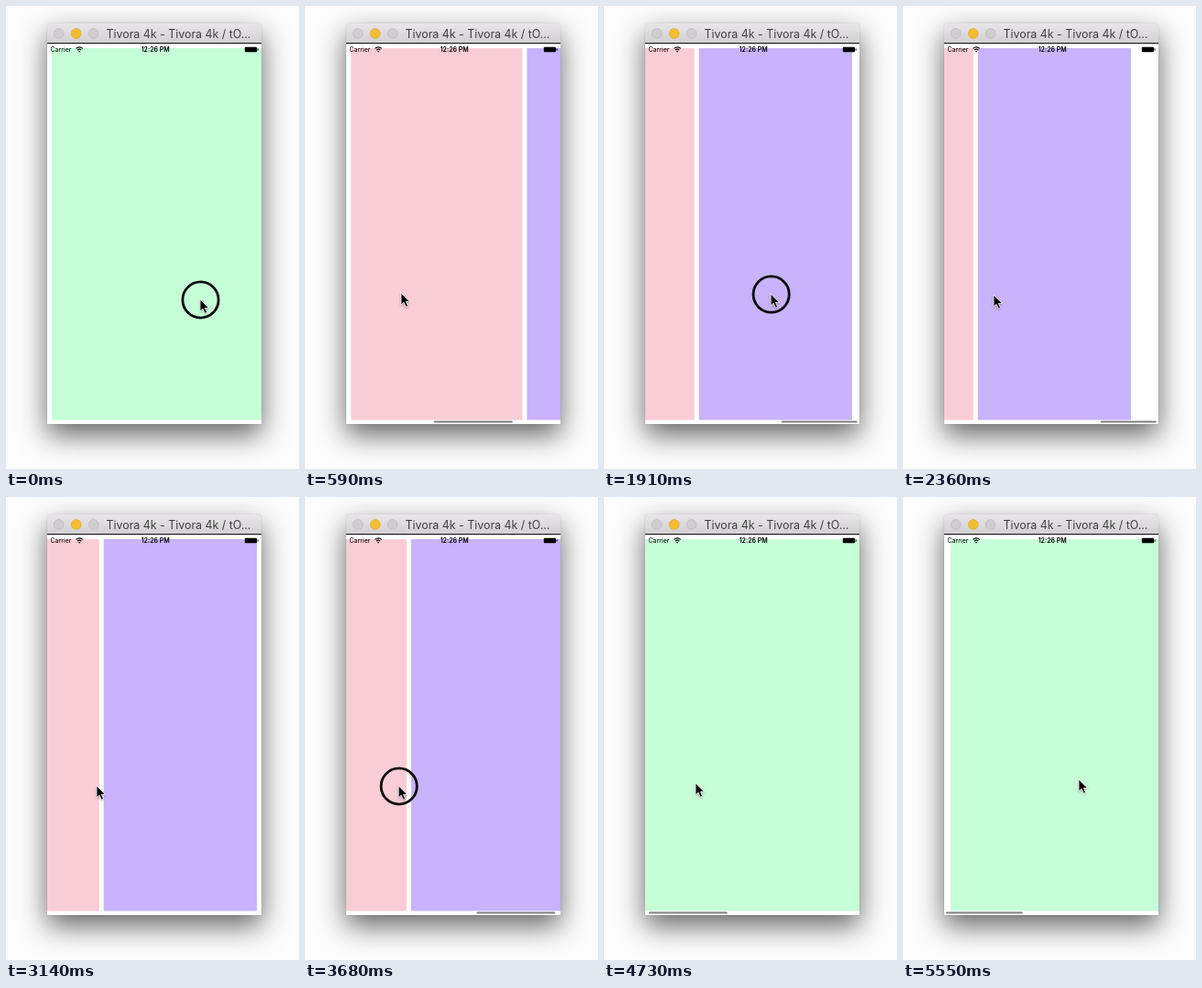
Write an HTML page that moves like this. It is 320 px wide and 505 px high and loops after 5.6 s.

```html
<!DOCTYPE html>
<html lang="en">
<head>
<meta charset="utf-8">
<title>Paged cells</title>
<style>
  html, body { margin: 0; width: 100%; height: 100%; overflow: hidden; background: #fdfcfd; }
  #stage { position: relative; width: 320px; height: 505px; overflow: hidden; }
  #shadow {
    position: absolute; left: 45px; top: 19px; width: 234px; height: 437px;
    border-radius: 4px 4px 0 0;
    box-shadow: 0 12px 30px rgba(0, 0, 0, .6), 0 0 1px rgba(0, 0, 0, .4);
  }
  svg { position: absolute; left: 0; top: 0; display: block; }
  text { font-family: Inter, "Open Sans", sans-serif; }
</style>
</head>
<body>
<div id="stage">
  <div id="shadow"></div>
  <svg width="320" height="505" viewBox="0 0 320 505">
    <defs>
      <linearGradient id="bar" x2="0" y2="1">
        <stop stop-color="#e8e6e8"/><stop offset="1" stop-color="#d1cfd1"/>
      </linearGradient>
      <clipPath id="screen"><path d="M45 41h234v415H45z"/></clipPath>
    </defs>

    <path d="M45 41V23q0-4 4-4h226q4 0 4 4v18z" fill="url(#bar)"/>
    <g stroke-width=".7">
      <circle cx="57.7" cy="30" r="5.4" fill="#cfcdcf" stroke="#bbb9bb"/>
      <circle cx="76.7" cy="30" r="5.4" fill="#f4bd31" stroke="#dda72b"/>
      <circle cx="95.6" cy="30" r="5.4" fill="#cfcdcf" stroke="#bbb9bb"/>
    </g>
    <text x="109.5" y="34.5" font-size="12.4" fill="#414041">Tivora 4k - Tivora 4k / tO...</text>

    <path d="M45 40h234v416H45z" fill="#fff"/>
    <path d="M45 40h234v1.2H45z" fill="#222"/>
    <g clip-path="url(#screen)">
      <g id="cells"></g>
      <rect id="thumb" y="452.6" height="2" rx="1" fill="#808080"/>
    </g>

    <text x="48.5" y="50.2" font-size="7">Carrier</text>
    <g fill="none" stroke="#000" stroke-width="1.1">
      <path d="M76.4 46.4q3.7-3 7.4 0M77.9 48q2.2-1.8 4.4 0"/>
      <path d="M79.3 49.6h1.6"/>
    </g>
    <text x="163.2" y="50.3" font-size="7" font-weight="600" text-anchor="middle">12:26 PM</text>
    <rect x="260.8" y="44.8" width="13.2" height="5.4" rx="1"/>
    <path d="M274.6 46.2h.9v2.6h-.9z"/>

    <circle id="touch" r="19.6" fill="none" stroke="#0a0a0a" stroke-width="2.8"/>
    <path id="cursor" d="M0 0V13l3-2.8 2.2 5 2.3-1-2.2-4.8h4.2z"
          stroke="#fff" stroke-width=".8"
          style="filter:drop-shadow(0 1px 1px rgba(0,0,0,.3))"/>
  </svg>
</div>
<script>
const $ = id => document.getElementById(id);
const LOOP = 5600, VIEW = 234, LEFT = 45, SCALE = VIEW / 375;
const MAX = 1000 * SCALE - VIEW;

// Cells in points: start, width, colour
const cells = [[8, 400, '#c6ffd7'], [416, 300, '#f9cdd5'], [724, 268, '#c8b3fc']].map(([x, w, fill]) => {
  const r = document.createElementNS('http://www.w3.org/2000/svg', 'rect');
  const attrs = { y: 46, height: 405.5, width: w * SCALE, fill };
  for (const k in attrs) r.setAttribute(k, attrs[k]);
  $('cells').append(r);
  return { r, x: LEFT + x * SCALE };
});

const smooth = u => u * u * (3 - 2 * u);
const flick = u => u * u * u;

// Pointer path: time, x, y, easing towards this point
const path = [
  [0, 212, 320], [150, 212, 320], [449, 105, 313, flick], [650, 105, 313],
  [1270, 178, 313], [1450, 188, 314], [1850, 188, 314], [2240, 99, 315],
  [3250, 99, 315], [3400, 93, 315], [3480, 93, 315], [3951, 211, 315, flick],
  [4150, 211, 315], [4720, 100, 312], [4800, 100, 312], [5120, 192, 308],
  [LOOP, 192, 308]
];

function pointer(t) {
  const i = path.findIndex(p => p[0] > t);
  const [t0, x0, y0] = path[i - 1], [t1, x1, y1, ease = smooth] = path[i];
  const u = ease((t - t0) / (t1 - t0));
  return [x0 + (x1 - x0) * u, y0 + (y1 - y0) * u];
}

const stretch = d => VIEW * (1 - 1 / (d * .55 / VIEW + 1));
const rubber = s => s < 0 ? -stretch(-s) : s > MAX ? MAX + stretch(s - MAX) : s;
const glide = dt => Math.exp(-dt / 193);
const bounce = dt => (1 + dt * .0109) * Math.exp(-dt * .0109);

// Each drag: press, release, resting place, motion after release
const drags = [
  [0, 449, MAX, glide], [1850, 2240, MAX, bounce],
  [3480, 3951, 0, glide], [4800, 5120, 0, bounce]
];
let start = 0;
for (const d of drags) {
  const [press, release, rest, settle] = d;
  const x0 = pointer(press)[0], from = start;
  const pull = t => rubber(from + x0 - pointer(t)[0]);
  const end = pull(release);
  d.offset = t => t < release ? pull(t) : rest + (end - rest) * settle(t - release);
  const next = drags[drags.indexOf(d) + 1];
  if (next) start = d.offset(next[0]);
}

// Scroll indicator: shown from, fades from
const shown = [[150, 1450], [1850, 2780], [3480, LOOP]];
const clamp = (v, a, b) => Math.min(b, Math.max(a, v));

function draw(now) {
  const t = now % LOOP;
  const [x, y] = pointer(t);
  const drag = drags.findLast(d => d[0] <= t);
  const s = drag.offset(t);

  for (const c of cells) c.r.setAttribute('x', c.x - s);

  const inside = clamp(s, 0, MAX), over = Math.abs(s - inside);
  const seen = shown.findLast(v => v[0] <= t);
  $('thumb').setAttribute('x', 47 + inside / MAX * 143.7 + Math.max(0, s - MAX));
  $('thumb').setAttribute('width', 86 - over);
  $('thumb').setAttribute('opacity', seen ? 1 - clamp((t - seen[1]) / 250, 0, 1) : 0);

  $('cursor').setAttribute('transform', `translate(${x} ${y})`);
  $('touch').setAttribute('cx', x + .5);
  $('touch').setAttribute('cy', y + .5);
  $('touch').setAttribute('visibility', t < drag[1] ? 'visible' : 'hidden');
}

const begin = performance.now();
function tick() {
  draw(performance.now() - begin);
  requestAnimationFrame(tick);
}
tick();
</script>
</body>
</html>
```
